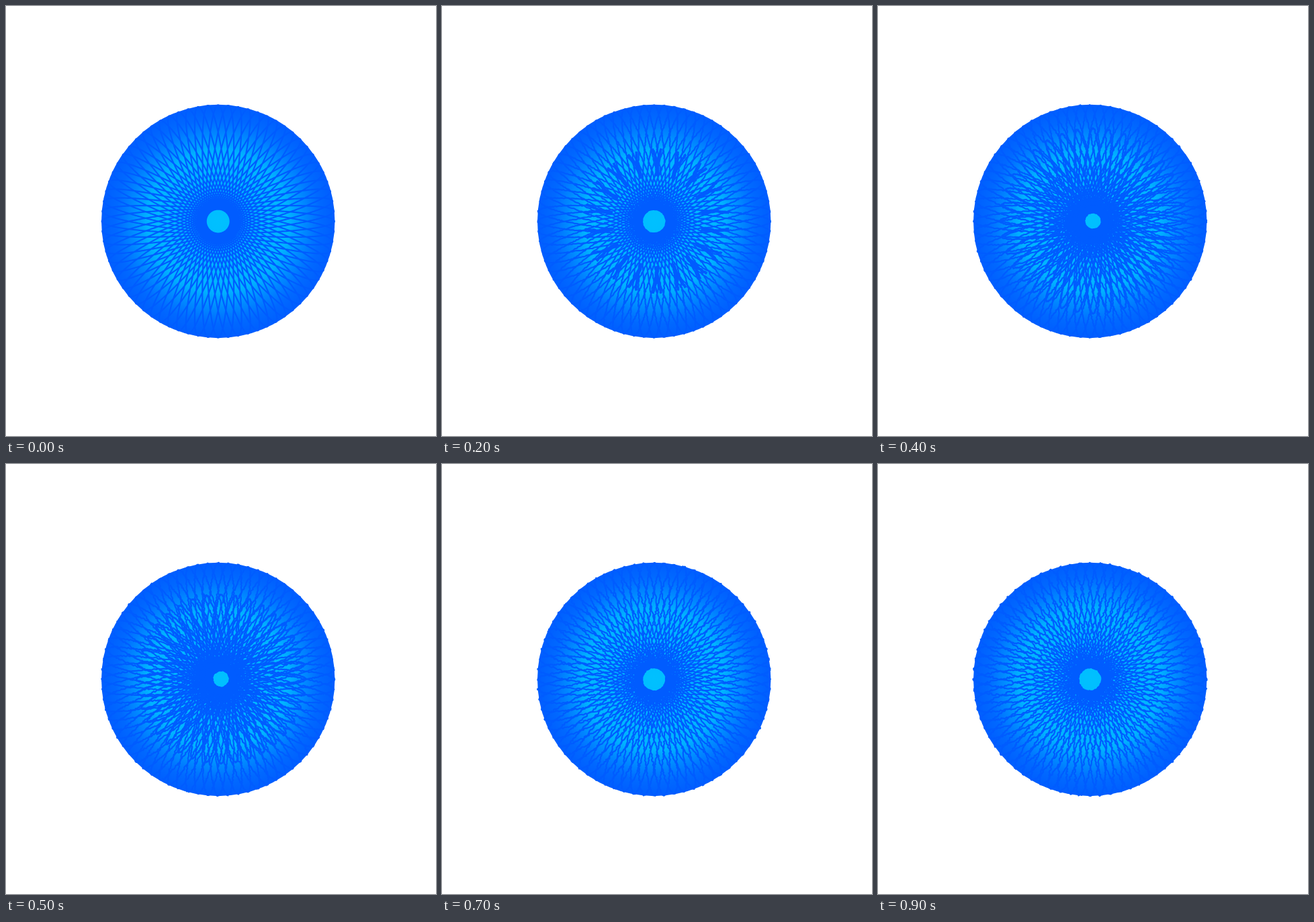
An HTML page with a canvas that plays this animation: 640x640 px, repeating every 1 s.

```html
<!DOCTYPE html>
<html lang="en">
<head>
<meta charset="utf-8">
<title>Blue star disc</title>
<style>
  html, body { margin: 0; width: 100%; height: 100%; overflow: hidden; background: #fff; }
  canvas { display: block; width: 640px; height: 640px; }
</style>
</head>
<body>
<canvas id="stage" width="640" height="640"></canvas>
<script>
const ctx = document.getElementById('stage').getContext('2d');
const TAU = Math.PI * 2;
const DARK = '#005cff';
const DISC = { x: 315.7, y: 320.5 };
const MID = { x: 320, y: 320 };
const RADIUS = 173;
const STEPS = 10;

let seed = 1;
function noise() {
  seed = (seed * 16807) % 2147483647;
  return seed / 1073741823.5 - 1;
}

// Angles run clockwise from the top.
function polar(c, r, a) {
  return [c.x + r * Math.sin(a), c.y - r * Math.cos(a)];
}

// Adds a line to the path, shaken sideways by up to amp.
function roughLine([x1, y1], [x2, y2], amp) {
  const len = Math.hypot(x2 - x1, y2 - y1);
  const n = amp ? Math.max(1, Math.round(len / 2)) : 1;
  const nx = (y1 - y2) / len, ny = (x2 - x1) / len;
  for (let i = 0; i <= n; i++) {
    const d = amp * noise(), u = i / n;
    const x = x1 + (x2 - x1) * u + nx * d;
    const y = y1 + (y2 - y1) * u + ny * d;
    if (i) ctx.lineTo(x, y); else ctx.moveTo(x, y);
  }
}

// Adds a slim ellipse whose long axis points along angle a.
function roughEllipse(c, long, short, a, amp) {
  const n = Math.round(long * 2);
  const sin = Math.sin(a), cos = Math.cos(a);
  for (let i = 0; i < n; i++) {
    const t = i * TAU / n;
    const u = long * Math.cos(t) + amp * noise();
    const v = short * Math.sin(t) + amp * noise();
    const x = c.x + u * sin + v * cos, y = c.y - u * cos + v * sin;
    if (i) ctx.lineTo(x, y); else ctx.moveTo(x, y);
  }
  ctx.closePath();
}

function stroke(width, build) {
  ctx.lineWidth = width;
  ctx.beginPath();
  build();
  ctx.stroke();
}

// Ellipses turned evenly through half a circle.
function rosette(c, count, long, short, width, amp) {
  stroke(width, () => {
    for (let i = 0; i < count; i++) {
      roughEllipse(c, long, short, i * Math.PI / count, amp);
    }
  });
}

function ring(c, r, width) {
  stroke(width, () => ctx.arc(c.x, c.y, r, 0, TAU));
}

function eachArm(draw) {
  for (let i = 0; i < 18; i++) draw(i * TAU / 18);
}

function forks(amp) {
  const at = (r, a) => polar(MID, r, a);
  stroke(6, () => eachArm(a => roughLine(at(67, a), at(92, a), amp)));
  stroke(4, () => eachArm(a => {
    roughLine(at(86, a), at(108, a - 0.06), amp);
    roughLine(at(86, a), at(108, a + 0.06), amp);
  }));
}

// An 18-sided ring whose sides may run on past the corners.
function gonRing(r, width, over, amp) {
  stroke(width, () => eachArm(a => {
    const p = polar(MID, r, a), q = polar(MID, r, a + TAU / 18);
    const dx = (q[0] - p[0]) * over, dy = (q[1] - p[1]) * over;
    roughLine([p[0] - dx, p[1] - dy], [q[0] + dx, q[1] + dy], amp);
  }));
}

function zigzag(amp) {
  stroke(4, () => eachArm(a => {
    const tip = polar(MID, 104, a);
    roughLine(tip, polar(MID, 66, a - TAU / 36), amp);
    roughLine(tip, polar(MID, 66, a + TAU / 36), amp);
  }));
}

function spokes(r, amp) {
  rosette(MID, 18, r, 13, 2.6, amp);
  ring(MID, 18, 12);
}

const overlays = {
  2: forks,
  3: amp => { gonRing(105, 5, 0.25, amp); zigzag(amp); },
  4: amp => spokes(138, amp),
  5: amp => spokes(126, amp),
  6: amp => spokes(114, amp),
  8: amp => { gonRing(102, 7, 0, amp * 0.6); ring(MID, 51, 14); }
};

function disc() {
  const fill = ctx.createRadialGradient(DISC.x, DISC.y, 0, DISC.x, DISC.y, RADIUS);
  fill.addColorStop(0, '#00c0ff');
  fill.addColorStop(0.6, '#00b4ff');
  fill.addColorStop(0.75, '#0088ff');
  fill.addColorStop(0.88, '#0069ff');
  fill.addColorStop(1, '#005eff');
  ctx.fillStyle = fill;
  ctx.beginPath();
  ctx.arc(DISC.x, DISC.y, RADIUS + 0.7, 0, TAU);
  ctx.fill();
}

function draw(step) {
  const amp = step ? 0.4 + step * 0.11 : 0;
  seed = 4211 + step * 97;
  ctx.clearRect(0, 0, 640, 640);
  ctx.strokeStyle = DARK;
  ctx.lineJoin = 'bevel';
  disc();
  rosette(DISC, 36, RADIUS, 18, 2.2, amp);
  if (overlays[step]) overlays[step](amp);
}

let shown = -1;
function tick() {
  const step = Math.floor(performance.now() % 1000 / 1000 * STEPS);
  if (step !== shown) draw(shown = step);
  requestAnimationFrame(tick);
}
tick();
</script>
</body>
</html>
```
